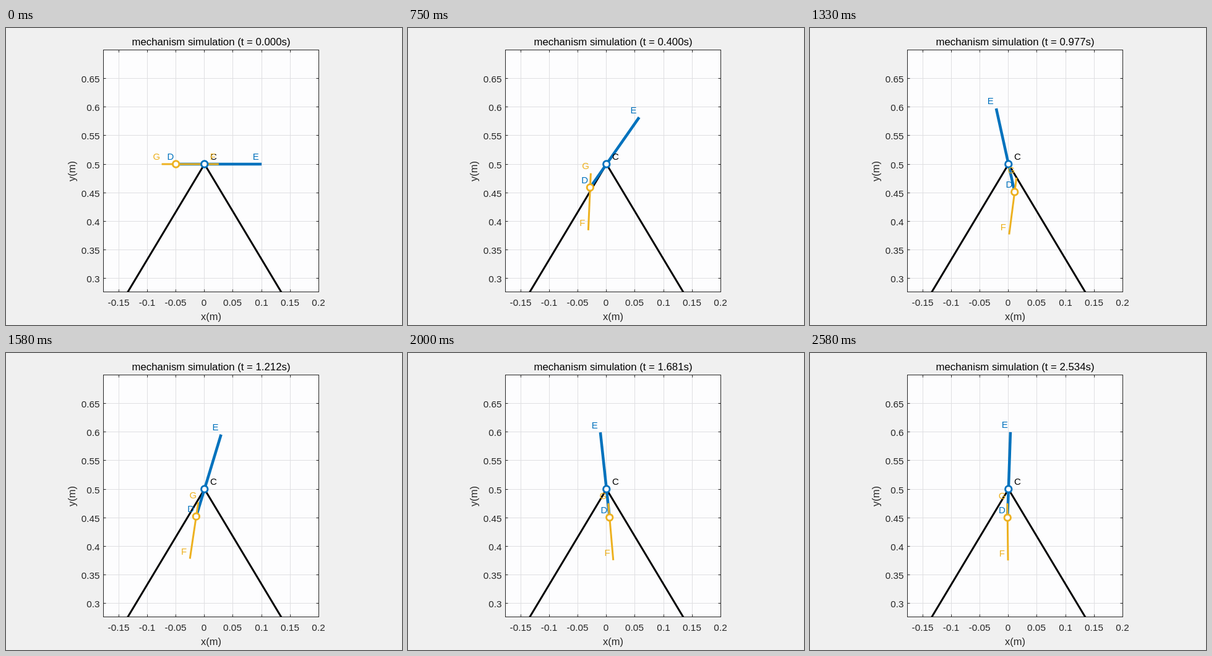
Write an HTML page with a canvas that moves like this. It is 640x480 px and loops after 2660 ms.

```html
<!DOCTYPE html>
<html lang="en">
<head>
<meta charset="utf-8">
<title>Mechanism simulation</title>
<style>
html, body { margin: 0; width: 100%; height: 100%; overflow: hidden; background: #f0f0f0; }
canvas { display: block; }
</style>
</head>
<body>
<canvas id="stage" width="640" height="480"></canvas>
<script>
const ctx = document.getElementById('stage').getContext('2d');
const FONT = '"Liberation Sans", Arial, sans-serif';
const BLUE = '#0072bd', GOLD = '#edb120', INK = '#262626', GRID = '#dfdfe2';
const PAPER = '#fdfdfe', FIGURE = '#f0f0f0';
const BOX = { l: 157.5, t: 35.5, r: 505.5, b: 426.5 };
const SCALE = 922.5, STEPS = 32, LOOP = 2660;
const C = { x: 320.8, y: 220 };

// The solver's uneven clock: step, simulated seconds
const CLOCK = [[0, 0], [5, .161], [12, .628], [16, .977], [22, 1.468], [27, 2.034], [31, 2.534]];

// Two uniform rods: the upper pivots at C, the lower hangs from D, both joints with friction
const ARM = .05, OFFSET = .025, GRAVITY = 9.81, MASS = 1.22, FRICTION = .01;
const UPPER = MASS * (.15 ** 2 / 12 + OFFSET ** 2) + ARM ** 2;
const LOWER = .1 ** 2 / 12 + OFFSET ** 2;

// Smooth curve through [x, y] points
function spline(pts, x) {
  const last = pts.length - 2;
  const secant = k => (pts[k + 1][1] - pts[k][1]) / (pts[k + 1][0] - pts[k][0]);
  const slope = k => {
    if (k === 0) return 2 * secant(0) - slope(1);
    if (k > last) return 2 * secant(last) - slope(last);
    const a = pts[k][0] - pts[k - 1][0], b = pts[k + 1][0] - pts[k][0];
    return (secant(k - 1) * b + secant(k) * a) / (a + b);
  };
  let i = 0;
  while (i < last && x >= pts[i + 1][0]) i++;
  const h = pts[i + 1][0] - pts[i][0], u = (x - pts[i][0]) / h, v = 1 - u;
  return pts[i][1] * (1 + 2 * u) * v * v + slope(i) * h * u * v * v
       + pts[i + 1][1] * u * u * (3 - 2 * u) - slope(i + 1) * h * u * u * v;
}

// State: both angles from straight down, then both angular speeds
function motion([a, b, va, vb]) {
  const link = ARM * OFFSET, cos = link * Math.cos(a - b), sin = link * Math.sin(a - b);
  const drag = FRICTION * (vb - va);
  const p = -GRAVITY * (ARM - MASS * OFFSET) * Math.sin(a) - FRICTION * va + drag - sin * vb * vb;
  const q = -GRAVITY * OFFSET * Math.sin(b) - drag + sin * va * va;
  const det = UPPER * LOWER - cos * cos;
  return [va, vb, (p * LOWER - q * cos) / det, (q * UPPER - p * cos) / det];
}

// One Runge-Kutta step
function advance(s, dt) {
  const add = (k, h) => s.map((v, i) => v + k[i] * h);
  const k1 = motion(s), k2 = motion(add(k1, dt / 2));
  const k3 = motion(add(k2, dt / 2)), k4 = motion(add(k3, dt));
  return s.map((v, i) => v + dt / 6 * (k1[i] + 2 * k2[i] + 2 * k3[i] + k4[i]));
}

function simulate() {
  const poses = [];
  let state = [-Math.PI / 2, Math.PI / 2, 0, 0], now = 0;
  for (let i = 0; i < STEPS; i++) {
    const t = spline(CLOCK, i), n = 60, dt = (t - now) / n;
    for (let k = 0; k < n; k++) state = advance(state, dt);
    now = t;
    poses.push({ t, upper: state[0], lower: state[1] });
  }
  return poses;
}

function line(a, b, color, width) {
  ctx.strokeStyle = color;
  ctx.lineWidth = width;
  ctx.beginPath();
  ctx.moveTo(a.x, a.y);
  ctx.lineTo(b.x, b.y);
  ctx.stroke();
}

function text(str, x, y, size, align, color) {
  ctx.font = size + 'px ' + FONT;
  ctx.textAlign = align;
  ctx.fillStyle = color;
  ctx.fillText(str, x, y);
}

function joint(p, color) {
  ctx.beginPath();
  ctx.arc(p.x, p.y, 5.2, 0, 2 * Math.PI);
  ctx.fillStyle = PAPER;
  ctx.fill();
  ctx.strokeStyle = color;
  ctx.lineWidth = 3;
  ctx.stroke();
}

// Point at a distance in metres from p, angle measured from straight down
function along(p, angle, metres) {
  const d = metres * SCALE;
  return { x: p.x + d * Math.sin(angle), y: p.y + d * Math.cos(angle) };
}

const label = (name, p, color, dx = -14.2) => text(name, p.x + dx, p.y - 6.7, 15, 'left', color);
const seg = (x1, y1, x2, y2, color) => line({ x: x1, y: y1 }, { x: x2, y: y2 }, color, 1);
const snap = v => Math.floor(v) + .5;

function drawAxes() {
  const w = BOX.r - BOX.l, h = BOX.b - BOX.t;
  ctx.fillStyle = FIGURE;
  ctx.fillRect(0, 0, 640, 480);
  ctx.fillStyle = PAPER;
  ctx.fillRect(BOX.l, BOX.t, w, h);

  const xs = [], ys = [];
  for (let k = -3; k <= 4; k++) xs.push([k / 20, snap(C.x + k * SCALE / 20)]);
  for (let k = 6; k <= 13; k++) ys.push([k / 20, snap(C.y - (k - 10) * SCALE / 20)]);

  for (const [, x] of xs) seg(x, BOX.t, x, BOX.b, GRID);
  for (const [, y] of ys) seg(BOX.l, y, BOX.r, y, GRID);
  for (const [v, x] of xs) {
    seg(x, BOX.b, x, BOX.b - 4, INK);
    seg(x, BOX.t, x, BOX.t + 4, INK);
    text(String(v), x - .5, 449, 15.3, 'center', INK);
  }
  for (const [v, y] of ys) {
    seg(BOX.l, y, BOX.l + 4, y, INK);
    seg(BOX.r, y, BOX.r - 4, y, INK);
    text(String(v), 151.5, y + 6.5, 15.3, 'right', INK);
  }
  ctx.strokeStyle = INK;
  ctx.lineWidth = 1;
  ctx.strokeRect(BOX.l, BOX.t, w, h);

  text('x(m)', 331.5, 472, 16.5, 'center', INK);
  ctx.save();
  ctx.translate(112, 231.5);
  ctx.rotate(-Math.PI / 2);
  text('y(m)', 0, 0, 16.5, 'center', INK);
  ctx.restore();
}

function draw({ t, upper, lower }) {
  const D = along(C, upper, ARM), E = along(C, upper, -.1);
  const F = along(D, lower, .075), G = along(D, lower, -.025);

  drawAxes();
  text('mechanism simulation (t = ' + t.toFixed(3) + 's)', 331.5, 27.5, 16.8, 'center', '#000');

  ctx.save();
  ctx.beginPath();
  ctx.rect(BOX.l, BOX.t, BOX.r - BOX.l, BOX.b - BOX.t);
  ctx.clip();
  for (const side of [-1, 1]) line(C, { x: C.x + side * 150, y: C.y + 250 }, '#000', 3);
  line(E, D, BLUE, 4.5);
  line(F, G, GOLD, 3);
  joint(C, BLUE);
  joint(D, GOLD);
  ctx.restore();

  label('C', C, '#000', 9.2);
  label('D', D, BLUE);
  label('E', E, BLUE);
  label('F', F, GOLD);
  label('G', G, GOLD);
}

// Steps run at twelve per second, rounded to hundredths
const startOf = i => Math.round(i * 100 / 12) * 10;
const poses = simulate();
let shown = -1;

function tick() {
  const ms = performance.now() % LOOP;
  let i = 0;
  while (i < STEPS - 1 && startOf(i + 1) <= ms) i++;
  if (i !== shown) draw(poses[shown = i]);
  requestAnimationFrame(tick);
}
tick();
</script>
</body>
</html>
```
